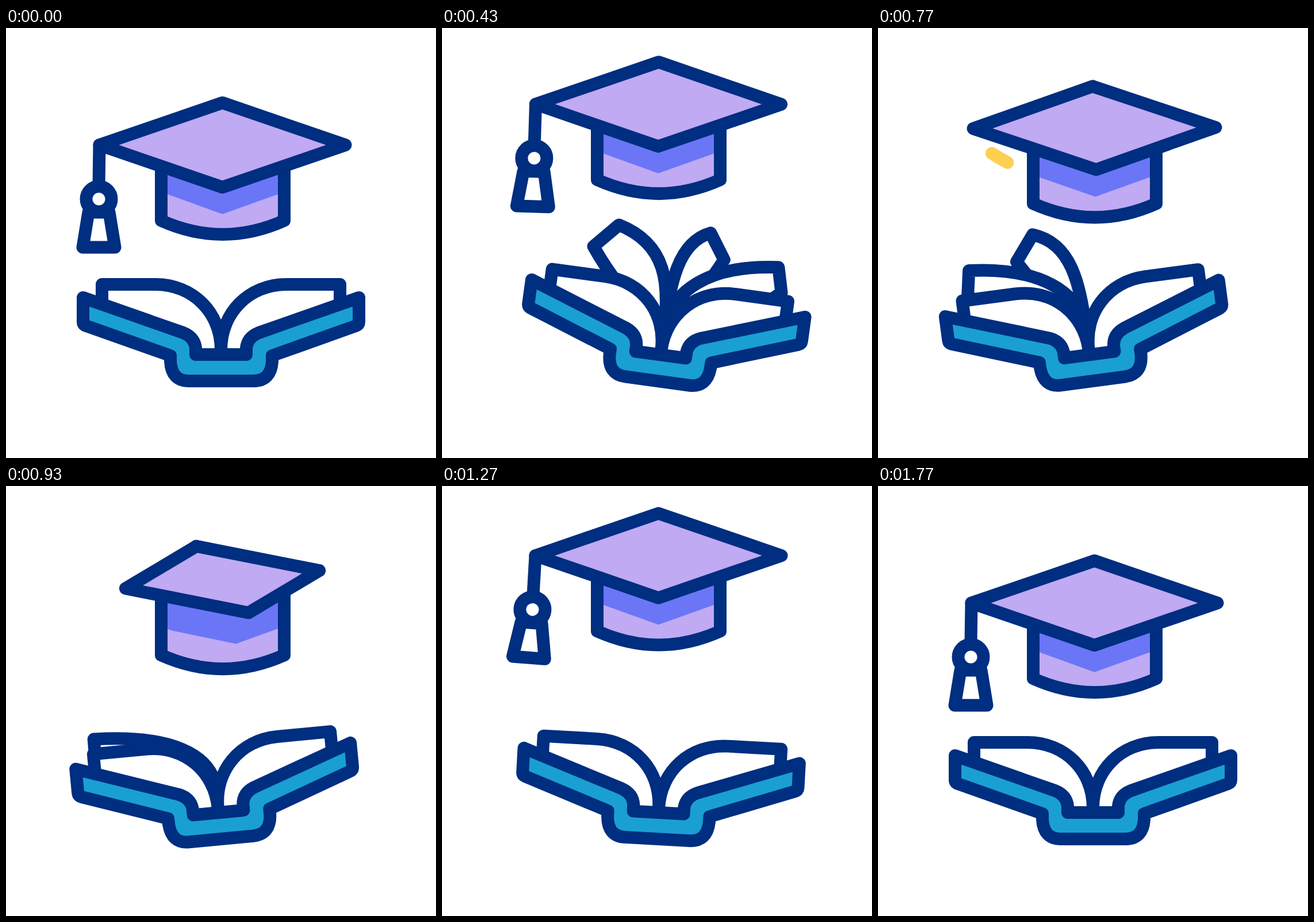
Recreate the animation shown at these times as an HTML page. Size 748 by 748 pixels, loop 1.81 s.

```html
<!DOCTYPE html>
<html lang="en">
<head>
<meta charset="utf-8">
<title>Cap and book</title>
<style>
  html, body { margin: 0; width: 100%; height: 100%; overflow: hidden; background: #fff; }
  svg { display: block; width: 100vw; height: 100vh; }
  .line { stroke: #002e80; stroke-width: 22; stroke-linejoin: round; stroke-linecap: round; fill: #fff; }
  .none { fill: none; }
  .lavender { fill: #bfaaf3; }
  .cyan { fill: #1a9fd3; }
  #swoosh { fill: none; stroke: #fdcf52; stroke-width: 22; stroke-linecap: round; }
</style>
</head>
<body>
<svg viewBox="0 0 748 748">
  <defs>
    <path id="bodyShape" d="M270 222V335Q377 383 484 335V222Z"/>
    <clipPath id="bodyClip"><use href="#bodyShape"/></clipPath>
    <path id="leftPage" d="M167 485V446H260C325 446 374 495 374 560"/>
  </defs>

  <g id="book">
    <g id="leaves"></g>
    <use href="#leftPage" class="line"/>
    <use href="#leftPage" class="line" transform="matrix(-1 0 0 1 748 0)"/>
    <path class="line cyan" d="M134 469L308 530Q328 538 330 557V568H418V557Q420 538 440 530L614 469V511Q614 516 609 518L463 570V580Q461 614 430 614H318Q288 614 286 580V570L139 518Q134 516 134 511Z"/>
  </g>

  <g id="cap">
    <g id="tassel">
      <path class="line none" d="M0 0L-1 70"/>
      <g id="tip">
        <path class="line" d="M-18 23H18L28 84H-28Z"/>
        <circle class="line" r="22"/>
      </g>
    </g>
    <use href="#bodyShape" class="lavender"/>
    <path id="shade" fill="#6b76f7" clip-path="url(#bodyClip)"/>
    <use href="#bodyShape" class="line none"/>
    <path id="board" class="line lavender"/>
  </g>

  <path id="swoosh" pathLength="1"/>
</svg>

<script>
const LOOP = 1810;
const SPINE = 374;
const LEAF_COUNT = 4, LEAF_FIRST = 112, LEAF_GAP = 122, LEAF_TIME = 480;

// Every part eases from pose to pose on the same beats.
const poses = [
  { at: 0, lift: 0, tilt: 0, spin: 0, swing: 0 },
  { at: 420, lift: 71, tilt: 7.8, spin: 0, swing: 10.6 },
  { at: 800, lift: 29, tilt: -7.8, spin: 1, swing: -12 },
  { at: 1230, lift: 85, tilt: 3.3, spin: 0, swing: 7.3 },
  { at: 1600, lift: 0, tilt: 0, spin: 0, swing: 0 },
  { at: LOOP, lift: 0, tilt: 0, spin: 0, swing: 0 }
];

const $ = id => document.getElementById(id);
const ramp = (t, from, to) => Math.max(0, Math.min(1, (t - from) / (to - from)));
const ease = u => (1 - Math.cos(Math.PI * u)) / 2;
const mix = (a, b, u) => a + (b - a) * u;
const put = (el, attrs) => { for (const k in attrs) el.setAttribute(k, attrs[k]); };

const leaves = Array.from({ length: LEAF_COUNT }, () => {
  const leaf = document.createElementNS('http://www.w3.org/2000/svg', 'path');
  leaf.setAttribute('class', 'line');
  return $('leaves').appendChild(leaf);
});

function poseAt(t) {
  const i = poses.findIndex(p => p.at > t);
  const from = poses[i - 1], to = poses[i];
  const u = ramp(t, from.at, to.at), e = ease(u);
  return {
    lift: mix(from.lift, to.lift, e),
    tilt: mix(from.tilt, to.tilt, e),
    spin: mix(from.spin, to.spin, e),
    swing: from.swing * Math.sin(Math.PI * u)
  };
}

// A leaf turns from the right side (0) over to the left side (1).
function leafPath(turn) {
  if (turn <= 0 || turn >= 1) return '';
  const up = Math.sin(Math.PI * turn);
  const reach = 207 * Math.cos(Math.PI * turn);
  const topX = SPINE + reach, topY = 446 - 103 * up ** .8;
  const lowX = topX + 60 * Math.sin(2 * Math.PI * turn) * up * up, lowY = topY + 43;
  const bendX = SPINE + reach * .35 * (1 - up ** 4), bendY = topY + 25 * up;
  return `M${SPINE} 530C${SPINE} ${470 - 30 * up} ${bendX} ${bendY} ${topX} ${topY}`
    + `L${lowX} ${lowY}Q${mix(SPINE, lowX, .6)} ${lowY + 75} ${SPINE} 530Z`;
}

function drawBook(t, tilt) {
  put($('book'), { transform: `rotate(${tilt} ${SPINE} 615)` });
  // Upright leaves lie behind the flatter ones.
  const turns = leaves.map((_, i) => ramp(t - LEAF_FIRST - i * LEAF_GAP, 0, LEAF_TIME))
    .sort((a, b) => Math.abs(a - .5) - Math.abs(b - .5));
  leaves.forEach((leaf, i) => put(leaf, { d: leafPath(turns[i]) }));
}

function drawCap({ lift, spin, swing }) {
  // Each board corner slides along the edge towards the next corner.
  const dx = 214 * (1 - spin), dy = 73.5 * spin, ex = 214 * spin, ey = 73.5 * (1 - spin);
  const corner = (x, y) => `${376.5 + x} ${203.5 + y}`;
  put($('cap'), { transform: `translate(0 ${-lift})` });
  put($('board'), {
    d: `M${corner(-dx, -dy)}L${corner(ex, -ey)}L${corner(dx, dy)}L${corner(-ex, ey)}Z`
  });

  // The shade is a narrower copy of the board's front edges.
  const shadeX = x => 376.5 + .52 * x, shadeY = y => 284 + .54 * y;
  const vx = shadeX(-ex), vy = shadeY(ey), rx = shadeX(dx), ry = shadeY(dy), slope = .36;
  put($('shade'), {
    d: `M260 200V${vy - slope * (vx - 260)}L${vx} ${vy}L${rx} ${ry}L500 ${ry - slope * (500 - rx)}V200Z`
  });

  put($('tassel'), { transform: `translate(${corner(-dx, -dy)}) rotate(${swing})` });
  put($('tip'), { transform: `translate(-1 94) rotate(${.8 * swing})` });
}

function drawSwoosh(t) {
  const back = t > 860;
  const head = back ? ramp(t, 944, 1124) : ramp(t, 510, 680);
  const tail = back ? ramp(t, 1015, 1195) : ramp(t, 572, 788);
  put($('swoosh'), {
    d: back ? 'M199 250C300 320 450 320 590 225' : 'M577 204C470 273 320 298 198 218',
    visibility: head > tail ? 'visible' : 'hidden',
    'stroke-dasharray': `${Math.max(head - tail, .001)} 3`,
    'stroke-dashoffset': -tail
  });
}

function draw(t) {
  const pose = poseAt(t);
  drawBook(t, pose.tilt);
  drawCap(pose);
  drawSwoosh(t);
}

const start = performance.now();
function loop() {
  draw((performance.now() - start) % LOOP);
  requestAnimationFrame(loop);
}
loop();
</script>
</body>
</html>
```
